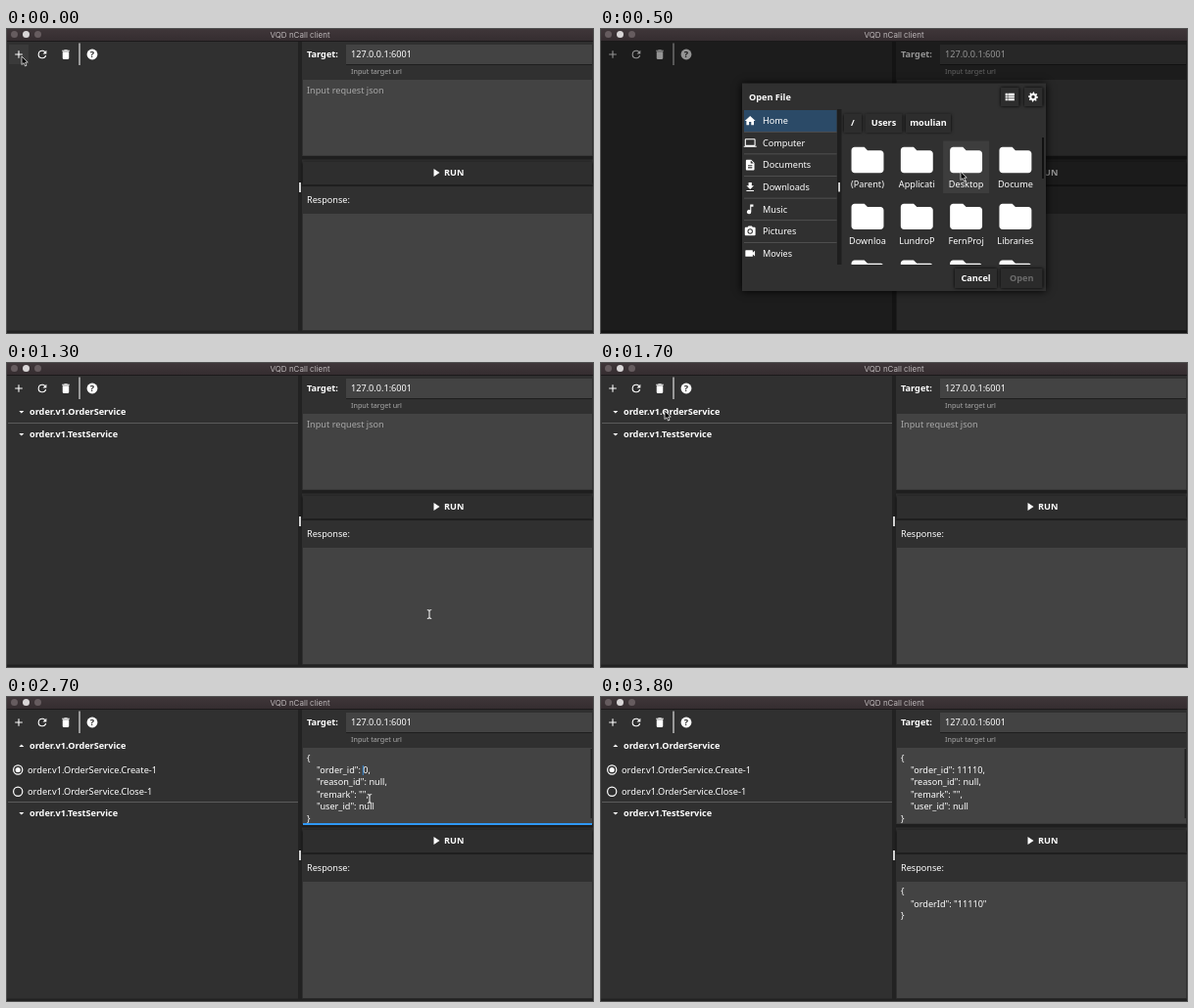
An HTML page with a canvas for the animation above (3.9 s loop, 600 by 313 pixels).

```html
<!DOCTYPE html>
<html lang="en">
<head>
<meta charset="utf-8">
<title>Request client</title>
<style>
  html, body { margin: 0; width: 600px; height: 313px; overflow: hidden; background: #222; }
  canvas { display: block; }
</style>
</head>
<body>
<canvas id="stage" width="600" height="313"></canvas>
<script>
const ctx = document.getElementById('stage').getContext('2d');
const STEP = 100, STEPS = 39;
const BG = '#303030', FIELD = '#434343', DARK = '#1e1e1e', BLUE = '#2f98f5', SELECTED = '#2b4a67';

// Icons on a 24 unit grid
const circle = r => `M12 ${12 - r}a${r} ${r} 0 1 0 0 ${2 * r} ${r} ${r} 0 1 0 0 ${-2 * r}z`;
const gearOutline = 'M' + Array.from({ length: 32 }, (_, i) => {
  const r = i % 4 < 2 ? 10 : 7.3, a = i * Math.PI / 16;
  return `${12 + r * Math.cos(a)} ${12 + r * Math.sin(a)}`;
}).join('L') + 'z';
const sheet = 'M14 2H6c-1.1 0-2 .9-2 2v16c0 1.1.9 2 2 2h12c1.1 0 2-.9 2-2V8l-6-6z';
const icons = {
  add: 'M19 13h-6v6h-2v-6H5v-2h6V5h2v6h6z',
  refresh: 'M17.65 6.35C16.2 4.9 14.2 4 12 4a8 8 0 1 0 7.73 10h-2.08A6 6 0 1 1 12 6c1.66 0 3.14.69 4.22 1.78L13 11h7V4z',
  trash: 'M6 19c0 1.1.9 2 2 2h8c1.1 0 2-.9 2-2V7H6zM19 4h-3.5l-1-1h-5l-1 1H5v2h14z',
  disc: circle(10),
  home: 'M10 20v-6h4v6h5v-8h3L12 3 2 12h3v8z',
  computer: 'M20 18c1.1 0 2-.9 2-2V6c0-1.1-.9-2-2-2H4c-1.1 0-2 .9-2 2v10c0 1.1.9 2 2 2H0v2h24v-2zM4 6h16v10H4z',
  document: sheet + 'M16 18H8v-2h8zM16 14H8v-2h8zM13 9V3.5L18.5 9z',
  download: 'M19 9h-4V3H9v6H5l7 7zM5 18v2h14v-2z',
  music: 'M12 3v10.55A4 4 0 1 0 14 17V7h4V3z',
  camera: 'M9 2 7.17 4H4c-1.1 0-2 .9-2 2v12c0 1.1.9 2 2 2h16c1.1 0 2-.9 2-2V6c0-1.1-.9-2-2-2h-3.17L15 2z' + circle(5) + circle(3.2),
  video: 'M17 10.5V7c0-.55-.45-1-1-1H4c-.55 0-1 .45-1 1v10c0 .55.45 1 1 1h12c.55 0 1-.45 1-1v-3.5l4 4v-11z',
  folder: 'M10 4H4c-1.1 0-2 .9-2 2v12c0 1.1.9 2 2 2h16c1.1 0 2-.9 2-2V8c0-1.1-.9-2-2-2h-8z',
  page: sheet + 'M13.5 8.5V3.5L18.5 8.5z',
  list: 'M4 10h4v4H4zM4 15h4v4H4zM4 5h4v4H4zM9 10h12v4H9zM9 15h12v4H9zM9 5h12v4H9z',
  gear: gearOutline + circle(3.5),
  lines: 'M2 4h20v5H2zM2 14h13v5H2z',
  picture: 'M2 20 9 8l5 7 3-4 5 9zM16 3h4v4h-4z',
};
for (const name in icons) icons[name] = new Path2D(icons[name]);

function icon(name, x, y, size = 13, color = '#fff') {
  ctx.save();
  ctx.translate(x - size / 2, y - size / 2);
  ctx.scale(size / 24, size / 24);
  ctx.fillStyle = color;
  ctx.fill(icons[name], 'evenodd');
  ctx.restore();
}

function rect(x, y, right, bottom, color, blur = 0) {
  ctx.save();
  ctx.shadowColor = '#000';
  ctx.shadowBlur = blur;
  ctx.fillStyle = color;
  ctx.fillRect(x, y, right - x, bottom - y);
  ctx.restore();
}

function text(s, x, y, { color = '#fff', bold = false, size = 9.15, align = 'left', family = 'Noto Sans' } = {}) {
  ctx.font = `${bold ? 700 : 400} ${size}px "${family}", sans-serif`;
  ctx.fillStyle = color;
  ctx.textAlign = align;
  ctx.fillText(s, x, y);
}

function poly(color, ...points) {
  ctx.beginPath();
  points.forEach(([x, y]) => ctx.lineTo(x, y));
  ctx.closePath();
  ctx.fillStyle = color;
  ctx.fill();
}

function dot(x, y, r, color) {
  ctx.beginPath();
  ctx.arc(x, y, r, 0, 7);
  ctx.fillStyle = color;
  ctx.fill();
}

function button(label, x, y, right, bottom, fill = '#2d2d2d', color = '#fff') {
  rect(x, y, right, bottom, fill, 3);
  text(label, (x + right) / 2, (y + bottom) / 2 + 3.2, { bold: true, align: 'center', color });
}

// Pointer keys: step, x, y
const path = [
  [0, 16, 29], [1, 16, 29], [4, 340, 140], [5, 368, 147], [7, 368, 147], [9, 322, 198], [10, 322, 198],
  [12, 433, 258], [13, 432, 258], [14, 432, 258], [17, 66, 50], [19, 66, 50], [21, 94, 79], [23, 94, 79],
  [26, 366, 103], [27, 371, 105], [30, 371, 105], [32, 452, 146], [36, 452, 146], [37, 520, 296], [38, 560, 330],
];

function pointerAt(n) {
  const i = Math.max(1, path.findIndex(key => key[0] >= n));
  const [n0, x0, y0] = path[i - 1], [n1, x1, y1] = path[i];
  const k = (n - n0) / (n1 - n0);
  return [x0 + (x1 - x0) * k, y0 + (y1 - y0) * k];
}

function drawPointer([x, y], modal) {
  const overField = !modal && x > 303 && x < 598 && (y > 190 && y < 309 || y > 53 && y < 130);
  ctx.save();
  ctx.translate(x, y);
  if (overField) {
    ctx.beginPath();
    for (const s of [-1, 1]) {
      ctx.moveTo(-2.2, 4.5 * s);
      ctx.quadraticCurveTo(0, 4.5 * s, 0, 2.5 * s);
      ctx.quadraticCurveTo(0, 4.5 * s, 2.2, 4.5 * s);
    }
    ctx.moveTo(0, -3);
    ctx.lineTo(0, 3);
    ctx.strokeStyle = '#ddd';
    ctx.lineWidth = 1.2;
    ctx.stroke();
  } else {
    poly('#000', [0, 0], [0, 8.5], [2, 6.7], [3.5, 10], [5, 9.3], [3.6, 6.2], [6.2, 6]);
    ctx.strokeStyle = '#eee';
    ctx.lineWidth = .8;
    ctx.stroke();
  }
  ctx.restore();
}

function drawService(name, y, open) {
  const s = open ? -1 : 1;
  poly('#fff', [13.3, y - s], [18.3, y - s], [15.8, y + 1.6 * s]);
  text(name, 24, y + 3.2, { bold: true });
}

function drawMethod(name, y, checked) {
  ctx.beginPath();
  ctx.arc(12.2, y, 4.6, 0, 7);
  ctx.strokeStyle = '#fff';
  ctx.lineWidth = 1.2;
  ctx.stroke();
  if (checked) dot(12.2, y, 2.6, '#fff');
  text(name, 22, y + 3.2, { size: 9.25 });
}

function drawLeft(n) {
  rect(1, 14, 298, 309.5, BG);
  if (n < 2) rect(3, 17, 23, 37, '#3a3a3a');
  icon('add', 13, 27);
  icon('refresh', 37, 27);
  icon('trash', 61, 27);
  rect(74.5, 15.5, 75.5, 38, '#fff');
  icon('disc', 88, 27);
  text('?', 88, 30.2, { bold: true, align: 'center', color: BG });
  if (n < 13) return;
  const open = n >= 19;
  drawService('order.v1.OrderService', 51, open);
  if (open) {
    drawMethod('order.v1.OrderService.Create-1', 75.5, n >= 23);
    drawMethod('order.v1.OrderService.Close-1', 97.8, false);
  }
  const line = open ? 108 : 62;
  rect(2, line, 298, line + .8, '#666');
  drawService('order.v1.TestService', open ? 120 : 74, false);
}

function drawRight(n) {
  const focused = n >= 26 && n < 33;
  rect(302, 14, 599, 309.5, BG);
  text('Target:', 307, 30.2, { bold: true });
  rect(347, 17, 598, 37, FIELD);
  rect(347, 37, 598, 38, DARK);
  text('127.0.0.1:6001', 352, 30.2);
  text('Input target url', 352, 46.7, { size: 7.2, color: '#aaa' });
  rect(303, 53, 598, 130, FIELD);
  rect(302, 131, 599, 134.5, DARK);
  if (n < 23) {
    text('Input request json', 307, 66.5, { color: '#a8a8a8' });
  } else {
    const typed = '1'.repeat(Math.min(4, Math.max(0, n - 27) * 2));
    const prefix = `"order_id": ${typed}`;
    text('{', 307, 66.5);
    [`${prefix}0,`, '"reason_id": null,', '"remark": "",', '"user_id": null']
      .forEach((row, i) => text(row, 317, 78.9 + i * 12.4));
    text('}', 307, 128.5);
    if (focused) {
      const caret = 317 + ctx.measureText(prefix).width;
      rect(caret - .5, 71, caret + .3, 81, BLUE);
    }
    rect(596.5, 54, 598, 125, '#222');
  }
  rect(303, 130, 598, focused ? 132 : 131, focused ? BLUE : '#383838');
  rect(303, 136.5, 598, 160, '#2e2e2e', 3);
  poly('#fff', [436.5, 144], [436.5, 152], [442.5, 148]);
  text('RUN', 447, 151.3, { bold: true });
  rect(302, 160.5, 599, 162, DARK);
  text('Response:', 307, 178.5);
  rect(303, 190, 598, 309, FIELD);
  if (n >= 34) {
    text('{', 307, 203.2);
    text('"orderId": "11110"', 317, 215.6);
    text('}', 307, 228);
  }
}

const places = { Home: 'home', Computer: 'computer', Documents: 'document', Downloads: 'download', Music: 'music', Pictures: 'camera', Movies: 'video' };
const homeFiles = ['(Parent)', 'Applicati', 'Desktop', 'Docume', 'Downloa', 'LundroP', 'FernProj', 'Libraries', 'Movies', 'Music', 'Pictures', 'Public']
  .map(name => [name]);
const desktopFiles = [
  ['(Parent)'], ['Lotus Ki', '.xlsx', 'gear'], ['Relocate'], ['Veltor', '.app', 'folder'],
  ['MurmurI', '.jpeg', 'picture'], ['a-test', '.prot'], ['abstract', '.txt'], ['cld_cen', '.pem'],
  ['notes', '.txt'], ['orders', '.txt'], ['report', '.xlsx', 'gear'], ['todo', '.txt'],
];

function drawFile([name, ext, mark = 'lines'], i, selected, [px, py]) {
  const x = 273 + i % 4 * 50.3, y = 135 + Math.floor(i / 4) * 57.8;
  const hovered = py < 242 && Math.abs(px - x) < 24 && py > y - 20 && py < y + 34;
  if (selected || hovered) rect(x - 23.5, y - 19.5, x + 23.5, y + 34, selected ? SELECTED : '#3d3d3d');
  if (!ext || mark === 'folder') {
    icon('folder', x, y, 39.5);
  } else {
    icon('page', x, y, 40.5);
    icon(mark, x - 5, y - 10, 11, BG);
  }
  if (ext) text(ext, x, y + 7, { align: 'center', color: '#444' });
  text(name, x, y + 27.7, { align: 'center' });
}

function drawDialog(n, pointer) {
  const inDesktop = n >= 7, picked = n >= 10;
  rect(0, 14, 600, 313, 'rgba(0,0,0,.42)');
  rect(145, 56.5, 455, 269, BG, 8);
  text('Open File', 152, 74, { bold: true });
  rect(409, 61, 427.5, 80, '#2d2d2d', 3);
  icon('list', 418, 70.5);
  rect(433, 61, 451.5, 80, '#2d2d2d', 3);
  icon('gear', 442, 70.5, 12);

  if (!inDesktop) rect(147, 84, 241.5, 106, SELECTED);
  Object.entries(places).forEach(([name, glyph], i) => {
    const y = 94.9 + i * 22.62;
    icon(glyph, 153.2, y);
    text(name, 166, y + 3.2);
    if (i < 6) rect(147, y + 11, 241.5, y + 11.7, '#5c5c5c');
  });
  rect(242, 83, 246.5, 242, DARK);
  rect(243.3, 158, 244.8, 167.5, '#fff');

  button('/', 249, 87.5, 267, 107);
  button('Users', 270.5, 87.5, 308.5, 107);
  button('moulian', 312, 87.5, 358, 107);
  if (inDesktop) button('Desktop', 361.5, 87.5, 412.5, 107);

  ctx.save();
  ctx.beginPath();
  ctx.rect(247, 109, 206, 133);
  ctx.clip();
  (inDesktop ? desktopFiles : homeFiles).forEach((file, i) => drawFile(file, i, picked && i === 5, pointer));
  rect(451, 112, 453, 154, '#111');
  ctx.restore();

  if (picked) text('a-test.proto', 152, 259.2);
  button('Cancel', 362, 246, 405, 266);
  button('Open', 409, 246, 451.5, 266, picked ? BLUE : '#2b2b2b', picked ? '#25313c' : '#6c6c6c');
}

function drawWindowFrame() {
  const shade = ctx.createLinearGradient(0, 0, 0, 13);
  shade.addColorStop(0, '#40373a');
  shade.addColorStop(1, '#352d30');
  rect(0, 0, 600, 13, shade);
  rect(0, 13, 600, 14, '#1b191a');
  [8.5, 20.5, 32.5].forEach((x, i) => dot(x, 6.5, 3.5, i === 1 ? '#d9d6d7' : '#665c5f'));
  text('VQD nCall client', 300, 9.6, { size: 8, align: 'center', color: '#bdb7b9', family: 'Inter' });
  ctx.strokeStyle = '#505050';
  ctx.lineWidth = 1;
  ctx.strokeRect(.5, .5, 599, 312);
}

function draw(n) {
  const pointer = pointerAt(n), modal = n >= 2 && n < 13;
  rect(0, 0, 600, 313, '#222');
  drawLeft(n);
  drawRight(n);
  rect(299.2, 158, 300.8, 168, '#fff');
  if (modal) drawDialog(n, pointer);
  drawWindowFrame();
  drawPointer(pointer, modal);
}

function tick() {
  draw(Math.floor(performance.now() / STEP) % STEPS);
  requestAnimationFrame(tick);
}
tick();
</script>
</body>
</html>
```
